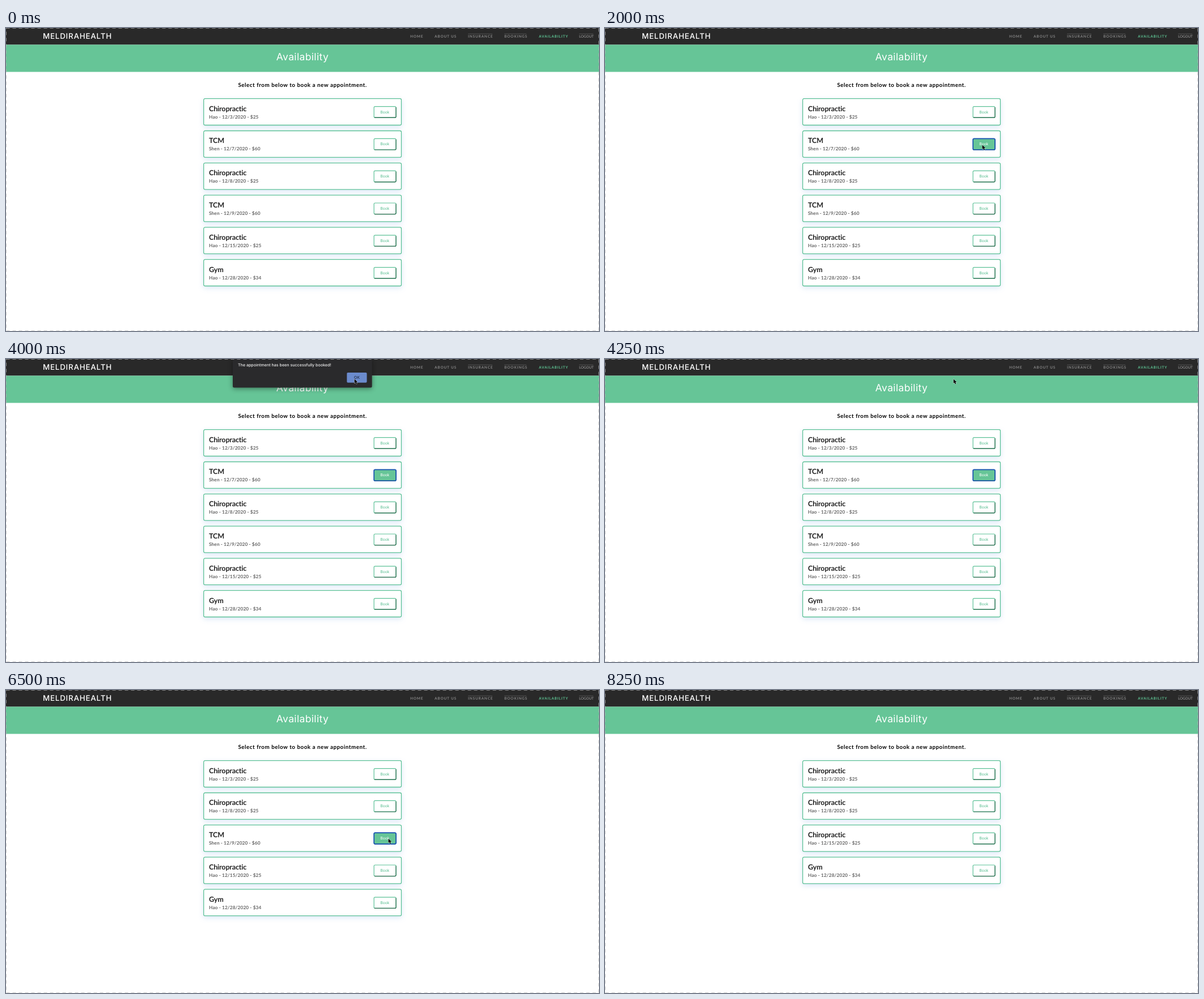
Recreate the animation shown at these times as an HTML page. Size 1046x535 px, loop 9000 ms.

```html
<!DOCTYPE html>
<html lang="en">
<head>
<meta charset="utf-8">
<title>Availability</title>
<style>
  html, body { margin: 0; width: 100%; height: 100%; overflow: hidden; background: #fff; }
  svg { display: block; width: 1046px; height: 535px; text-rendering: geometricPrecision; }
  text { font-family: Lato, sans-serif; font-weight: 700; }
  .brand { font: 500 13.4px Inter, sans-serif; letter-spacing: .77px; fill: #fff; }
  .nav { font-size: 6.4px; letter-spacing: .87px; fill: #878787; }
  .nav.active { fill: #5fc695; }
  .nav.plain { font-size: 6.2px; font-weight: 400; letter-spacing: 0; fill: #aaa; }
  .hero { font: 400 17.5px Inter, sans-serif; letter-spacing: .35px; fill: #fff; }
  .lead { font-size: 9.8px; letter-spacing: .54px; fill: #000; }
  .title { font-size: 12.6px; letter-spacing: -.2px; fill: #222; }
  .sub { font-size: 8.3px; letter-spacing: .1px; fill: #666; }
  .btn { font-size: 7px; font-weight: 400; fill: #58bd90; }
  .btn.on { fill: #fff; }
  .msg { font: 500 7.1px Inter, sans-serif; fill: #f2f2f2; }
  .ok { font: 500 7px Inter, sans-serif; fill: #25304a; }
  .mid { text-anchor: middle; }
  .card { fill: #fff; stroke: #5cc197; stroke-width: 1.3; filter: drop-shadow(0 3px 5px rgba(80, 140, 220, .2)); }
  .dialog { fill: #2a2a2c; filter: drop-shadow(0 2px 4px rgba(0, 0, 0, .4)); }
</style>
</head>
<body>
<svg viewBox="0 0 1046 535">
  <g id="page"></g>
  <g id="live"></g>
  <rect x=".5" y=".5" width="1045" height="534" fill="none" stroke="#b4b4b4" stroke-opacity=".65" stroke-dasharray="6 5"/>
</svg>
<script>
const LOOP = 9000, TICK = 250;
const GREEN = '#66c597';

const slots = [
  ['Chiropractic', 'Hao - 12/3/2020 - $25'],
  ['TCM', 'Shen - 12/7/2020 - $60'],
  ['Chiropractic', 'Hao - 12/8/2020 - $25'],
  ['TCM', 'Shen - 12/9/2020 - $60'],
  ['Chiropractic', 'Hao - 12/15/2020 - $25'],
  ['Gym', 'Hao - 12/28/2020 - $34']
];

// Pointer stops: time, x, y
const stops = [
  [250, 721, 224], [1250, 665.5, 206.5], [2500, 665.5, 206.5], [3500, 614.5, 35],
  [5000, 615, 36], [5250, 683.5, 216.5], [6250, 674.5, 262.5], [6500, 674.5, 262.5],
  [7500, 615, 36], [8250, 615, 36]
];

const text = (x, y, cls, s) => `<text x="${x}" y="${y}" class="${cls}">${s}</text>`;
const rect = (x, y, w, h, attrs) => `<rect x="${x}" y="${y}" width="${w}" height="${h}" ${attrs}/>`;
const during = (t, from, to) => t >= from && t < to;

function pointerAt(t) {
  const i = stops.findIndex((s, k) => k < stops.length - 1 && during(t, s[0], stops[k + 1][0]));
  if (i < 0) return null;
  const [t0, x0, y0] = stops[i], [t1, x1, y1] = stops[i + 1];
  const p = (t - t0) / (t1 - t0), e = p * p * (3 - 2 * p);
  return { x: x0 + (x1 - x0) * e, y: y0 + (y1 - y0) * e };
}

function page() {
  const links = [[713, 16.6, 'HOME'], [756, 17, 'ABOUT US'], [815, 17, 'INSURANCE'],
    [879, 17, 'BOOKINGS'], [940, 17, 'AVAILABILITY', 'active'], [1011, 17, 'LOGOUT', 'plain']];
  return rect(0, 0, 1046, 29.5, 'fill="#292929"') +
    rect(0, 29.5, 1046, 48, `fill="${GREEN}"`) +
    text(65, 19.2, 'brand', 'MELDIRAHEALTH') +
    links.map(([x, y, s, cls = '']) => text(x, y, 'nav ' + cls, s)).join('') +
    '<path d="M815 10.3h43M879 10.3h39M1011 10.3h25" stroke="#777" stroke-width=".5"/>' +
    text(523, 57, 'hero mid', 'Availability') +
    text(523, 103.5, 'lead mid', 'Select from below to book a new appointment.');
}

function button(fill, focused) {
  const box = attrs => rect(649.1, 14.6, 38.8, 19.6, `rx="2" ${attrs}`);
  return box(`fill="${GREEN}" fill-opacity="${fill}" stroke="#5cc197" stroke-width="1.2"`) +
    '<path d="M650 34.2h36q1.9 0 1.9-2V16" fill="none" stroke="#2b6b4e" stroke-width="1.2"/>' +
    (focused ? box('fill="none" stroke="#1c53b5" stroke-width="1.7"') : '') +
    text(668.2, 26.7, 'btn mid' + (fill > .5 ? ' on' : ''), 'Book');
}

function card([title, sub], i, fill, focused) {
  return `<g transform="translate(0 ${(124 + i * 56.8).toFixed(1)})">` +
    rect(348.7, .7, 348.7, 46.8, 'rx="2.5" class="card"') +
    text(358, 22.6, 'title', title) + text(358, 35.6, 'sub', sub) +
    button(fill, focused) + '</g>';
}

function dialog(okColor) {
  return '<path class="dialog" d="M400 0h245.6v48q0 2.5-2.5 2.5H402.5q-2.5 0-2.5-2.5z"/>' +
    text(409, 12.6, 'msg', 'The appointment has been successfully booked!') +
    rect(601.3, 24, 35.2, 17.7, `rx="1.8" fill="${okColor}"`) +
    text(618.9, 35.4, 'ok mid', 'OK');
}

const arrow = ({ x, y }) => `<path transform="translate(${x} ${y})" d="M0 0v7.6l1.8-1.6 1.3 2.9 1.4-.6-1.3-2.8h2.4z"
  fill="#000" stroke="#fff" stroke-width=".7" paint-order="stroke"/>`;

function live(t) {
  const list = slots.filter((_, i) => !(i === 1 && t >= 4500) && !(i === 3 && t >= 8000));
  const hovered = during(t, 750, 4500) ? 1 : during(t, 5750, 8000) ? 2 : -1;
  const focused = during(t, 1500, 4500) ? 1 : during(t, 6500, 8000) ? 2 : -1;
  const fading = t === 5250 ? 0 : -1;
  const cards = list.map((slot, i) =>
    card(slot, i, i === hovered ? 1 : i === fading ? .12 : 0, i === focused));
  const open = during(t, 2500, 4250) || during(t, 6750, 7750);
  const okColor = t === 4000 ? '#6b8bcd' : t === 3500 || t === 3750 || t === 7500 ? '#7fa6f1' : '#8ab0f6';
  const pointer = pointerAt(t);
  return cards.join('') + (open ? dialog(okColor) : '') + (pointer ? arrow(pointer) : '');
}

const liveLayer = document.getElementById('live');
document.getElementById('page').innerHTML = page();
let shown = -1;

function frame() {
  const t = Math.floor(performance.now() % LOOP / TICK) * TICK;
  if (t !== shown) liveLayer.innerHTML = live(shown = t);
  requestAnimationFrame(frame);
}
frame();
</script>
</body>
</html>
```
